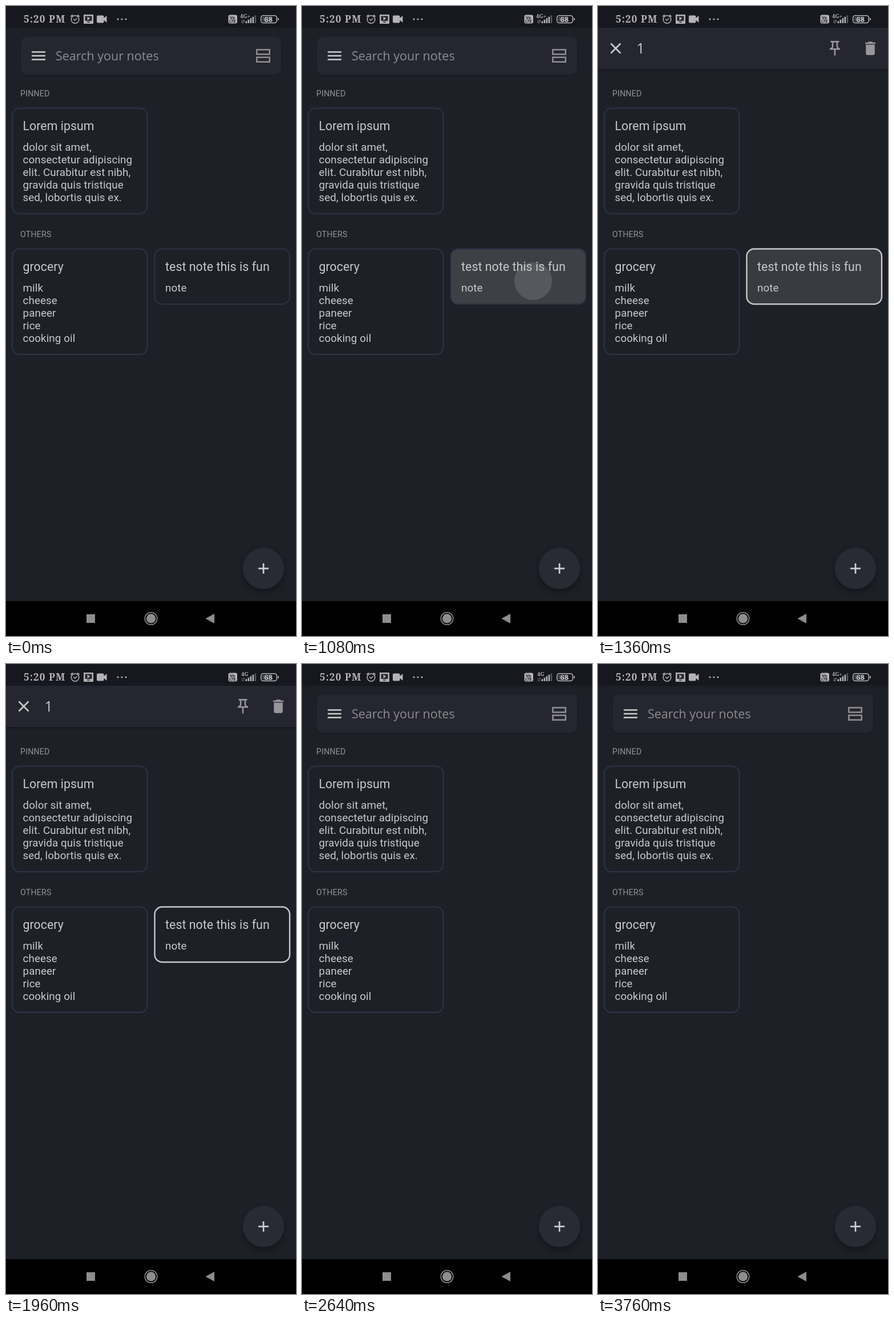
An HTML page with a canvas that plays this animation: 508 by 1101 pixels, repeating every 3.8 s.

```html
<!DOCTYPE html>
<html lang="en">
<head>
<meta charset="utf-8">
<title>Notes</title>
<style>
html, body { margin: 0; width: 100%; height: 100%; overflow: hidden; background: #1e2028; }
canvas { display: block; }
</style>
</head>
<body>
<canvas id="stage" width="508" height="1101"></canvas>
<script>
const ctx = document.getElementById('stage').getContext('2d');

const LOOP = 3800;
const TOUCH = 843, SELECT = 1250, DELETE = 2200, RELOADED = 2240;
const WEAK_FROM = 1720, WEAK_TO = 3520;

const BG = '#1e2028', PANEL = '#262630', TEXT = '#c8c9cb', DIM = '#8c8c90', STATUS = '#b4b4b6';
const ROBOTO = 'Roboto, sans-serif';
const SANS = '"Open Sans", "Noto Sans", sans-serif';
const SERIF = '"Noto Serif", serif';

const LOREM = {
  x: 11, y: 178.5, w: 236.5, h: 184.5, title: 'Lorem ipsum',
  lines: ['dolor sit amet,', 'consectetur adipiscing', 'elit. Curabitur est nibh,', 'gravida quis tristique', 'sed, lobortis quis ex.']
};
const GROCERY = {
  x: 11, y: 424.5, w: 236.5, h: 184.5, title: 'grocery',
  lines: ['milk', 'cheese', 'paneer', 'rice', 'cooking oil']
};
const TEST = { x: 260.5, y: 424.5, w: 236.5, h: 96.5, title: 'test note this is fun', lines: ['note'] };

const PIN = new Path2D('M14 4v5c0 1.12.37 2.16 1 3H9c.65-.86 1-1.9 1-3V4h4m3-2H7c-.55 0-1 .45-1 1s.45 1 1 1h1v5c0 1.66-1.34 3-3 3v2h5.97v7l1 1 1-1v-7H19v-2c-1.66 0-3-1.34-3-3V4h1c.55 0 1-.45 1-1s-.45-1-1-1z');
const TRASH = new Path2D('M6 19c0 1.1.9 2 2 2h8c1.1 0 2-.9 2-2V7H6v12zM19 4h-3.5l-1-1h-5l-1 1H5v2h14V4z');

const clamp = v => Math.max(0, Math.min(1, v));

function text(str, x, y, font, color, spacing = 0) {
  ctx.font = font;
  ctx.letterSpacing = spacing + 'px';
  ctx.fillStyle = color;
  ctx.fillText(str, x, y);
}

function rect(x, y, w, h, color) {
  ctx.fillStyle = color;
  ctx.fillRect(x, y, w, h);
}

function roundPath(x, y, w, h, r) {
  ctx.beginPath();
  ctx.roundRect(x, y, w, h, r);
}

function fillRound(x, y, w, h, r, color) {
  roundPath(x, y, w, h, r);
  ctx.fillStyle = color;
  ctx.fill();
}

function strokeRound(x, y, w, h, r, color, width) {
  roundPath(x, y, w, h, r);
  ctx.strokeStyle = color;
  ctx.lineWidth = width;
  ctx.stroke();
}

function disc(x, y, r, color) {
  ctx.beginPath();
  ctx.arc(x, y, r, 0, Math.PI * 2);
  ctx.fillStyle = color;
  ctx.fill();
}

function ring(x, y, r, color, width) {
  ctx.beginPath();
  ctx.arc(x, y, r, 0, Math.PI * 2);
  ctx.strokeStyle = color;
  ctx.lineWidth = width;
  ctx.stroke();
}

function poly(points, color) {
  ctx.beginPath();
  points.forEach(([x, y]) => ctx.lineTo(x, y));
  ctx.closePath();
  ctx.fillStyle = color;
  ctx.fill();
}

function line(points, color, width) {
  ctx.beginPath();
  points.forEach(([x, y]) => ctx.lineTo(x, y));
  ctx.strokeStyle = color;
  ctx.lineWidth = width;
  ctx.stroke();
}

function icon(path, cx, cy, color) {
  const s = 1.2935;
  ctx.save();
  ctx.translate(cx - 12 * s, cy - 12 * s);
  ctx.scale(s, s);
  ctx.fillStyle = color;
  ctx.fill(path);
  ctx.restore();
}

function withShadow(blur, dy, color, draw) {
  ctx.save();
  ctx.shadowBlur = blur;
  ctx.shadowOffsetY = dy;
  ctx.shadowColor = color;
  draw();
  ctx.restore();
}

function alarm() {
  ring(121, 23.5, 6.8, STATUS, 1.5);
  line([[113.3, 18.5], [117, 15.5]], STATUS, 1.7);
  line([[125, 15.5], [128.7, 18.5]], STATUS, 1.7);
  line([[118, 22.5], [120.5, 25.2], [124.5, 21.5]], STATUS, 1.4);
}

function screenCast() {
  rect(136, 15, 17, 16, STATUS);
  rect(138.5, 17.5, 12, 8.5, '#25262c');
  poly([[142.5, 18.8], [147.5, 21.8], [142.5, 24.8]], STATUS);
  rect(142, 27.3, 5, 1.5, '#25262c');
}

function signal(weak) {
  text(weak ? '4G' : '4G+', weak ? 412 : 410, 21, '600 9.5px ' + SERIF, STATUS);
  const arrows = weak ? '#65666b' : '#85868a';
  line([[413.7, 24], [413.7, 30]], arrows, 1);
  line([[416.7, 24], [416.7, 30]], arrows, 1);
  poly([[412.2, 28], [415.2, 28], [413.7, 30.5]], arrows);
  poly([[415.2, 26], [418.2, 26], [416.7, 23.5]], arrows);
  for (let i = 0; i < 5; i++) {
    const h = 3.5 + i * 2.6;
    rect(419.5 + i * 4, 30 - h, 2.6, h, i < 4 ? STATUS : '#55565c');
  }
}

function statusBar(weak) {
  rect(0, 0, 508, 38, '#17181f');
  text('5:20 PM', 31, 29, '600 17.2px ' + SERIF, STATUS, 1.1);
  alarm();
  screenCast();
  fillRound(159, 16.5, 12.5, 13, 2, STATUS);
  poly([[171, 21.5], [176.5, 17], [176.5, 29], [171, 24.5]], STATUS);
  [196, 203, 210].forEach(x => disc(x, 23, 1.6, STATUS));
  fillRound(389.5, 15.5, 15.5, 15, 3, STATUS);
  text('Vo', 392, 22.6, '700 7.5px ' + ROBOTO, '#17181f');
  text('LTE', 391.2, 29.3, '700 6.8px ' + ROBOTO, '#17181f');
  signal(weak);
  strokeRound(446.7, 16.7, 27.6, 12.8, 4, STATUS, 1.6);
  fillRound(449, 19, 17, 8.2, 2, '#4a4b50');
  text('68', 452.5, 27.5, '700 12.5px ' + SERIF, '#d0d0d2', 0.4);
  rect(476, 21, 1.8, 4, STATUS);
}

function searchBar() {
  withShadow(3, 1, 'rgba(0,0,0,.2)', () => fillRound(26, 53.5, 456, 66.5, 11, PANEL));
  [-1, 0, 1].forEach(i => rect(45, 85.7 + i * 6.6, 24, 2.6, '#c6c8c6'));
  text('Search your notes', 87, 95, '21.5px ' + SANS, DIM);
  ctx.strokeStyle = DIM;
  ctx.lineWidth = 2.6;
  [76.3, 89.7].forEach(y => ctx.strokeRect(439.4, y, 22.3, 8));
}

function selectionBar() {
  withShadow(4, 1.5, 'rgba(0,0,0,.35)', () => rect(0, 38, 508, 72, PANEL));
  rect(0, 34, 508, 4, '#17181f');
  line([[22.5, 65.5], [39.5, 82.5]], TEXT, 2.6);
  line([[39.5, 65.5], [22.5, 82.5]], TEXT, 2.6);
  text('1', 67.5, 83, '25px ' + SANS, TEXT);
  icon(PIN, 415, 74, '#97979b');
  icon(TRASH, 477, 74, '#97979b');
}

// Press highlight fades in while the splash spreads; both fade after the long press.
function ripple(card, t) {
  const held = t - TOUCH, after = t - SELECT;
  if (held < 0 || after > 200) return;
  const fade = 1 - clamp(after / 200);
  const radius = 0.1395 * Math.min(held, SELECT - TOUCH) + 100 * clamp(after / 120);
  ctx.save();
  roundPath(card.x, card.y, card.w, card.h, 13);
  ctx.clip();
  rect(card.x, card.y, card.w, card.h, `rgba(160,160,160,${0.25 * clamp(held / 200) * fade})`);
  disc(405, 480.7, radius, `rgba(160,160,160,${0.25 * fade})`);
  ctx.restore();
}

function note(card, selected) {
  strokeRound(card.x, card.y, card.w, card.h, 13, selected ? TEXT : '#2f3145', selected ? 2.4 : 2);
  const x = card.x + 18.5, y = card.y;
  text(card.title, x, y + 38, '21.3px ' + ROBOTO, TEXT, 0.06);
  card.lines.forEach((s, i) => text(s, x, y + 74 + i * 22, '18.8px ' + ROBOTO, TEXT, 0.1));
}

function label(str, y) {
  text(str, 25, y, '14.2px ' + ROBOTO, '#929397', 0.2);
}

function spinner(age) {
  const start = -Math.PI / 2 - 0.03;
  ctx.beginPath();
  ctx.arc(254, 608.5, 23.2, start, start + 0.25 + age * 0.001);
  ctx.strokeStyle = '#67686c';
  ctx.lineWidth = 5.2;
  ctx.stroke();
}

function addButton() {
  withShadow(11, 5, 'rgba(0,0,0,.36)', () => disc(451, 983, 36, '#2a2a34'));
  line([[442, 983], [460, 983]], '#cfcfd1', 2.7);
  line([[451, 974], [451, 992]], '#cfcfd1', 2.7);
}

function navBar() {
  const c = '#8d8d8d';
  rect(0, 1040, 508, 61, '#000');
  rect(141, 1063, 15, 15, c);
  ring(254, 1070.5, 10.8, c, 1.5);
  disc(254, 1070.5, 8.2, c);
  poly([[349.5, 1070.5], [365, 1062], [365, 1079]], c);
}

function draw(t) {
  const selecting = t >= SELECT && t < DELETE;
  rect(0, 0, 508, 1101, BG);
  statusBar(t >= WEAK_FROM && t < WEAK_TO);
  selecting ? selectionBar() : searchBar();
  label('PINNED', 158.2);
  if (t >= DELETE && t < RELOADED) {
    spinner(t - DELETE);
  } else {
    note(LOREM);
    label('OTHERS', 403.8);
    note(GROCERY);
    if (t < DELETE) {
      ripple(TEST, t);
      note(TEST, selecting);
    }
  }
  addButton();
  navBar();
}

let origin;
function tick(now) {
  origin ??= now;
  draw((now - origin) % LOOP);
  requestAnimationFrame(tick);
}
requestAnimationFrame(tick);
</script>
</body>
</html>
```
